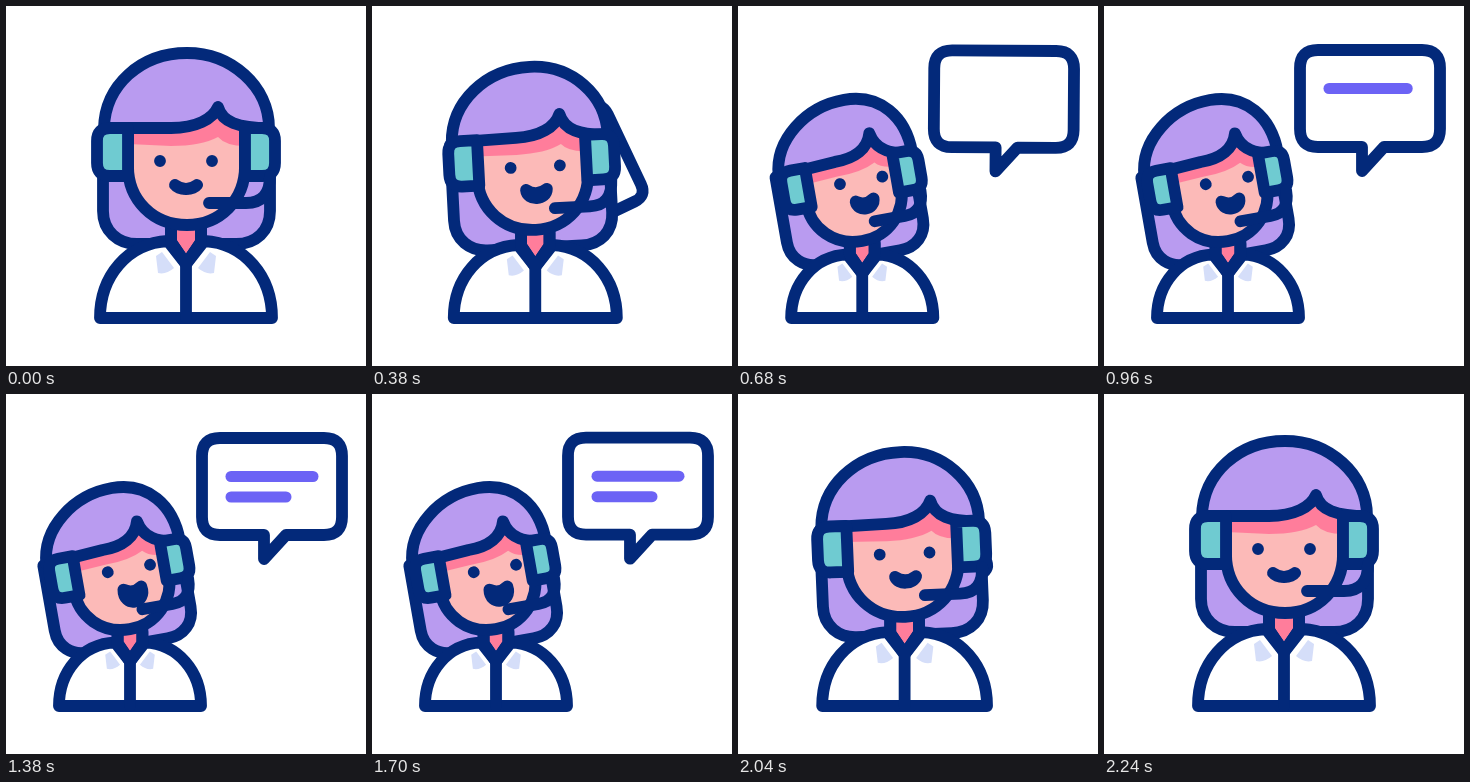
Animation of 360 by 360 pixels, one loop 2.4 s. Source, as an HTML page:

```html
<!DOCTYPE html>
<html lang="en">
<head>
<meta charset="utf-8">
<title>Support agent</title>
<style>
  html, body { margin: 0; width: 100%; height: 100%; overflow: hidden; background: #fff; }
  svg { display: block; width: 100vw; height: 100vh; }
  path { vector-effect: non-scaling-stroke; }
  .ink { stroke: #03297a; }
  .hair { fill: #b99bf0; }
  .skin { fill: #fcbab8; }
  .shade { fill: #ff7d9b; }
  .pad { fill: #6fcbd1; }
  .white { fill: #fff; }
  .tip { fill: #d5def9; }
  .text { stroke: #6c63f5; stroke-width: 11; }
</style>
</head>
<body>
<svg viewBox="0 0 360 360" fill="none" stroke-width="11.8" stroke-linecap="round" stroke-linejoin="round">
  <g id="bubble">
    <path class="ink white" d="M214 44H318Q336 44 336 62V123Q336 141 318 141H280L258 165V141H214Q196 141 196 123V62Q196 44 214 44Z"/>
    <path id="line1" class="text"/>
    <path id="line2" class="text"/>
  </g>
  <g id="person">
    <g class="head">
      <path id="back" class="ink hair" d="M97 125V205C97 225 112 238 131 238H230C250 238 264 225 264 205V125"/>
    </g>
    <path class="ink shade" d="M165 215V236L180 258L195 236V215"/>
    <path class="ink white" d="M94 312C94 270 122 237 162 235L180 258L198 235C238 237 266 270 266 312Z"/>
    <path class="tip" d="M156 246L168 262Q160 269 152 267L150 250ZM204 246L192 262Q200 269 208 267L210 250Z"/>
    <path class="ink" d="M165 222V236L180 258L195 236V222M180 258V312"/>
    <g class="head">
      <path class="shade" d="M122 105H239V165H122Z"/>
      <path id="skin" class="skin"/>
      <path class="ink" d="M122 120V160C122 194 147 219 181 219C214 219 239 194 239 160V120"/>
      <path id="cap" class="ink hair"/>
      <path id="padLeft" class="ink pad" d="M122 122H104Q91 122 91 135V157Q91 170 104 170H122Z"/>
      <path id="padRight" class="ink pad" d="M239 122H256Q269 122 269 135V157Q269 170 256 170H239Z"/>
      <path id="mic" class="ink" d="M264 170Q264 197 240 197H203"/>
      <g id="features">
        <path class="ink" d="M154 155h.01M206 155h.01"/>
        <path id="mouth" class="ink" fill="#03297a"/>
      </g>
    </g>
  </g>
</svg>
<script>
const LOOP = 2400;
const $ = id => document.getElementById(id);
const set = (el, name, value) => el.setAttribute(name, value);
const shift = (id, x, y) => set($(id), 'transform', `translate(${x} ${y})`);
const heads = document.querySelectorAll('.head');

// Eased progress from 0 to 1 between two times
const ease = (t, from, to) => {
  const x = Math.min(1, Math.max(0, (t - from) / (to - from)));
  return x * x * (3 - 2 * x);
};

function drawBubble(t, p) {
  const q = 1 - p, back = t > 1700;
  const lift = back && t < 1860 ? 17 * Math.sin(Math.PI * (t - 1700) / 160) : 0;
  const x = 258 - (back ? 119 : 128) * q;
  const y = 166 + (back ? 85 : 111) * q * p - 18 * q - lift;
  const angle = back ? 90 * ease(t, 1770, 2200) : 92 * q;
  const scale = 1 - (back ? 0.54 : 0.37) * q;
  set($('bubble'), 'visibility', p > 0.02 ? 'visible' : 'hidden');
  set($('bubble'), 'transform', `translate(${x} ${y}) rotate(${angle}) scale(${scale}) translate(-258 -166)`);
  drawLine($('line1'), 82.5, 82, ease(t, 700, 1000));
  drawLine($('line2'), 103, 55, ease(t, 1000, 1300));
}

function drawLine(el, y, length, k) {
  set(el, 'd', k > 0 ? `M225 ${y}h${length * k}` : '');
}

function drawPerson(t, p) {
  set($('person'), 'transform', `translate(${180 - 56 * p} 312) scale(${1 - 0.174 * p}) translate(-180 -312)`);
  heads.forEach(h => set(h, 'transform', `rotate(${-10 * p} 180 225)`));

  // The turn of the head moves its near and far parts apart
  shift('features', 12.5 * p, -8.5 * p);
  shift('back', -6 * p, 0);
  shift('padLeft', 6 * p, -2 * p);
  shift('padRight', -4 * p, -p);
  shift('mic', -3 * p, p);

  const end = 122 + 2 * p, mid = 122 - 3 * p, tip = 101 - 9 * p;
  const top = 181 + 8 * p, right = 263 - 4 * p;
  set($('cap'), 'd', `M${98 - 3 * p} ${end}C${99 - p} 80 ${top - 47} 47 ${top} 47C${top + 44} 47 ${right} 80 ${right} ${end}` +
    `C232 122 216 ${mid - 6} 212 ${tip}C207 ${mid - 9} 190 ${mid} 165 ${mid}Z`);
  set($('skin'), 'd', `M122 ${end + 16}L165 ${mid + 18}Q195 ${mid + 18} 212 ${mid + 9}` +
    `Q220 ${mid + 18} 239 ${mid + 18}V160C239 194 214 219 181 219C147 219 122 194 122 160Z`);

  const talk = t > 540 ? 0.75 + 0.25 * Math.cos((t - 540) / 280 * 2 * Math.PI) : 1;
  const open = Math.min(1, 1.4 * p) * talk;
  const low = 184.3 + 17 * open;
  set($('mouth'), 'd', `M169 179Q180 187 191 179C${187 + 8 * open} ${low} ${173 - 8 * open} ${low} 169 179Z`);
}

function frame(now) {
  const t = now % LOOP;
  const p = ease(t, 200, 700) - ease(t, 1700, 2200);
  drawBubble(t, p);
  drawPerson(t, p);
  requestAnimationFrame(frame);
}
frame(0);
</script>
</body>
</html>
```
